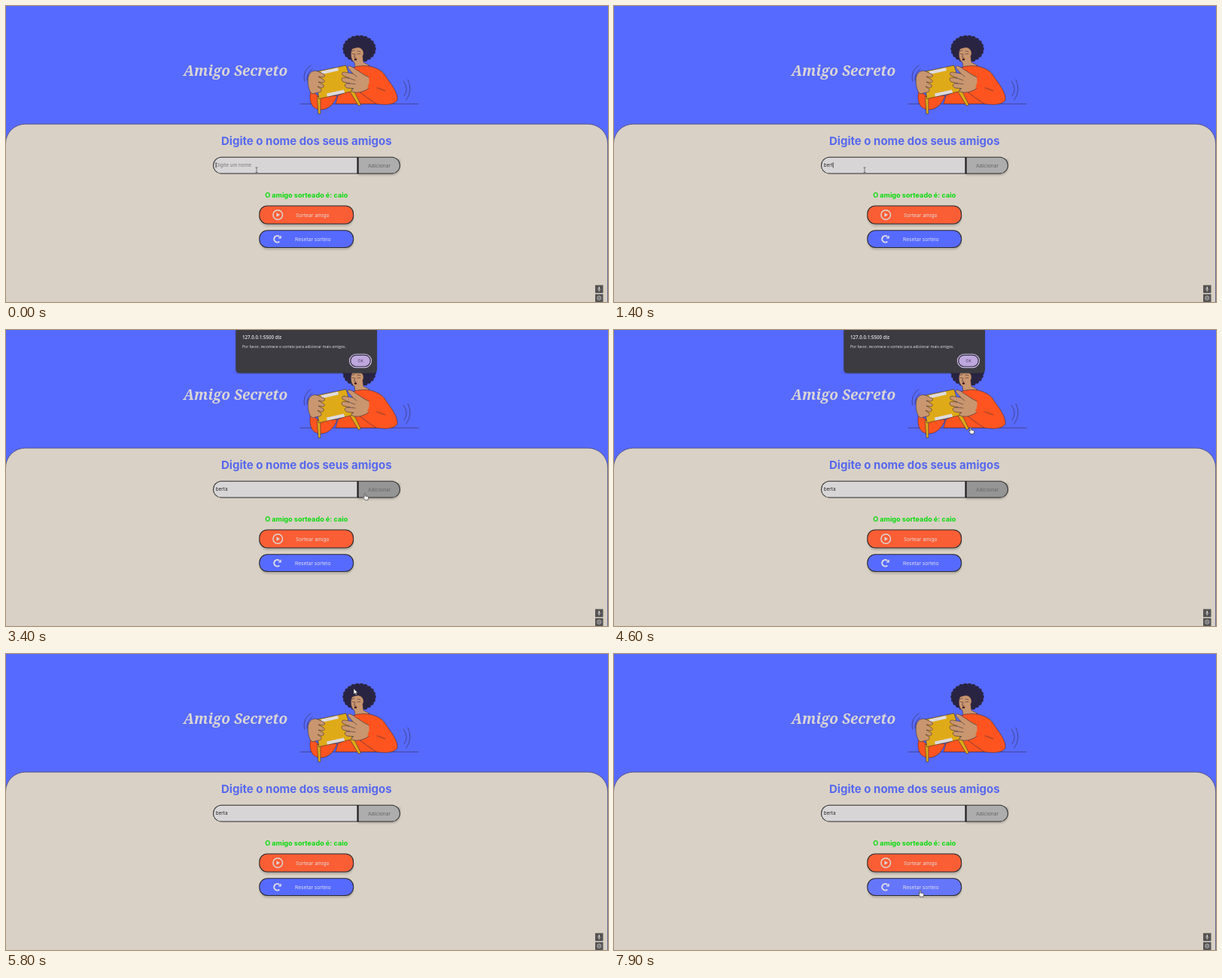
An HTML page for the animation above (8000 ms loop, 800 by 394 pixels).

```html
<!DOCTYPE html>
<html lang="pt-BR">
<head>
<meta charset="utf-8">
<title>Amigo Secreto</title>
<style>
  html, body { margin: 0; width: 100%; height: 100%; overflow: hidden; background: #576aff; }
  svg { display: block; width: 800px; height: 394px; }
  text { font-family: Inter, sans-serif; font-size: 6.7px; white-space: pre; }
  .mid { text-anchor: middle; }
  .title { font: italic 700 19px "Noto Serif", serif; fill: #d9d5d5; }
  .dialog text { font-family: "Open Sans", sans-serif; fill: #e4e2e8; }
  .ink { stroke: #33283a; stroke-width: .55; stroke-linejoin: round; stroke-linecap: round; }
  .line { fill: none; }
  .box { stroke: #2b292c; stroke-width: 1.05; }
  .shade { fill: #000; opacity: .17; filter: url(#soft); }
</style>
</head>
<body>
<svg viewBox="0 0 800 394">
  <defs>
    <filter id="soft" x="-20%" y="-40%" width="140%" height="180%"><feGaussianBlur stdDeviation="1.3"/></filter>
  </defs>
  <rect width="800" height="394" fill="#576aff"/>
  <text class="title mid" x="305" y="93">Amigo Secreto</text>

  <g id="art">
    <path class="ink line" d="M391 130.300H548"/>
    <path class="ink line" d="M405 79Q394 86 396.500 100M407 84Q399 90 400 99M528 100Q536 110 529 120M534 98Q541 112 532 125"/>
    <g id="hair" fill="#2a2443"></g>
    <path class="ink" fill="#c9966f" d="M460 57C457 63 458 72 463 75L464 81Q474 87 483 79L475 75L474 67C477 62 474 55 467 55Z"/>
    <path class="ink line" d="M460 63.500l3 .5M467 64l4 -.5M464 64l-1.500 4 2 .5M460 60l3-1M467 60l4 .5"/>
    <ellipse cx="464.500" cy="71" rx="1.800" ry="1.500" fill="#4b1c27"/>
    <path class="ink" fill="#ff5420" d="M461 82C477 76 498 81 505 94C514 107 521 116 520 125C517 132 502 132 492 130.300H438L441 119L458 112Z"/>
    <path class="ink line" d="M466 112C474 117 483 125 492 130.300M489 104l8 3M491 108l13 5"/>
    <path class="ink" fill="#ff5420" d="M405 112C402 125 405 136 416 138C428 139 437 130 440 119L417 121Z"/>
    <path class="ink" fill="#dfaa18" d="M413.500 121L415 143.500H418L417.800 121ZM456 112L468.500 133L471.500 131.500L461 110Z"/>
    <path class="ink" fill="#dfaa18" d="M411 87.500L452 79L462 113L416 123.500Z"/>
    <path fill="#dedbe0" d="M418.500 87L441 82L442 86L420 91ZM426 116.500L449 111.500L450 115.500L427 120.500Z"/>
    <path class="ink" fill="#c9966f" d="M402 93C404 87 410 85 414 87L423 91Q425 94 421 95L415 94L422 98Q425 101 421 102L415 101L422 105Q423 109 419 109L414 107L419 111Q420 115 415 115L407 117C402 114 400 101 402 93Z"/>
    <path class="ink" fill="#c9966f" d="M488 98L475 91L460 81Q454 78 454 82L461 90L450 88Q445 88 447 92L456 96L448 95Q444 97 448 101L457 103L452 103Q448 106 453 109L462 110L459 111Q459 115 464 115C473 116 480 111 484 108Z"/>
    <path class="ink line" d="M456 96l8 3M457 103l7 1M461 90l5 4"/>
    <path fill="#ff5420" d="M482 95Q487 92 491 96L499 107L486 110L480 108Q484 102 482 95Z"/>
  </g>

  <path d="M-.5 395V183A26 26 0 0 1 25.500 157.200H773.500A26 26 0 0 1 799.600 183V395Z" fill="#d9d1c5" stroke="#454365" stroke-width=".7"/>
  <text class="mid" x="399.300" y="184.800" style="font-size:15px;font-weight:700" fill="#5768ee">Digite o nome dos seus amigos</text>

  <path class="shade" d="M468 204H524V214A11 11 0 0 1 513 225.500H468Z"/>
  <path class="box" fill="#d7d5d6" d="M467 201.300H285.300A10.900 10.900 0 0 0 285.300 223H467Z"/>
  <path id="add" class="box" d="M468 201.300H513.700A10.900 10.900 0 0 1 513.700 223H468Z"/>
  <path d="M467.600 201V223.300" stroke="#222022" stroke-width="1.500"/>
  <text class="mid" x="496" y="214.500" fill="#66666a">Adicionar</text>
  <text id="field" x="278.700" y="214.200" style="font-size:6.4px"></text>
  <path id="caret" d="M0 208V215.500" stroke="#222" stroke-width=".7"/>

  <text class="mid" x="399.200" y="255" style="font-size:9.1px;font-weight:700" fill="#08dc0c">O amigo sorteado é: caio</text>

  <rect class="shade" x="337" y="269" width="125" height="24" rx="11"/>
  <rect class="box" x="336.800" y="265.900" width="124.800" height="24" rx="10.500" fill="#fa5e35"/>
  <circle cx="361.200" cy="278" r="6.300" fill="none" stroke="#ded9da" stroke-width="1.400"/>
  <path d="M359.500 275.300L364 278L359.500 280.700Z" fill="#ded9da"/>
  <text class="mid" x="407.300" y="280.500" fill="#e4dcdc">Sortear amigo</text>

  <rect class="shade" x="337" y="301" width="125" height="23.500" rx="11"/>
  <rect id="reset" class="box" x="336.800" y="298.700" width="124.800" height="22.800" rx="10.500"/>
  <path d="M363.300 306.900A4.300 4.300 0 1 0 363.300 313.500" fill="none" stroke="#dedce4" stroke-width="2"/>
  <path d="M365.800 305.300V309.600H361.500Z" fill="#dedce4"/>
  <text class="mid" x="407.800" y="312.500" fill="#dedff0">Resetar sorteio</text>

  <g fill="#555253">
    <rect x="783" y="371.500" width="10.500" height="10.500"/>
    <rect x="783" y="383.500" width="10.500" height="10.500"/>
  </g>
  <g fill="none" stroke="#dcdadb" stroke-width=".8">
    <path d="M788.200 374.500V376.500" stroke-width="1.600" stroke-linecap="round"/>
    <path d="M786.200 376.500Q788.200 380 790.200 376.500M788.200 378.300V380"/>
    <circle cx="788.200" cy="388.700" r="2.600"/><circle cx="788.200" cy="388.700" r=".6"/>
  </g>

  <g id="dialog" class="dialog">
    <path class="shade" d="M305 0H493V58H305Z"/>
    <path d="M305.300 0H493V52Q493 57.500 487.500 57.500H311Q305.300 57.500 305.300 52Z" fill="#3c3b41"/>
    <text x="314" y="11.900" style="font-size:6.2px;font-weight:600">127.0.0.1:5500 diz</text>
    <text x="314" y="24.100" style="font-size:5.1px">Por favor, recomece o sorteio para adicionar mais amigos.</text>
    <rect x="456.500" y="32.300" width="29" height="17.600" rx="8.800" fill="#302b3e" stroke="#d9c9f2" stroke-width="1.100"/>
    <rect x="458.300" y="34" width="25.400" height="14.200" rx="7.100" fill="#bda7dd"/>
    <text class="mid" x="471" y="43" style="font-size:5.2px;fill:#43305f">OK</text>
  </g>

  <g id="cursor">
    <path id="beam" d="M-1.500 -3H1.500M0 -3V3.500M-1.500 3.500H1.500" fill="none" stroke="#4b494b" stroke-width=".7"/>
    <path id="arrow" d="M0 0V7.500L1.800 6L3 8.600L4.300 8L3.200 5.500H5.500Z" fill="#f4f2f3" stroke="#222" stroke-width=".5"/>
    <path id="hand" d="M-.8 .7Q0 -.5 .8 .7V4L3.700 4.600Q5 5 4.800 6.300L4 9.300H.2L-2.700 5.700Q-2.300 4.300 -.8 5.600Z" fill="#f4f2f3" stroke="#222" stroke-width=".6"/>
  </g>
</svg>
<script>
const LOOP = 8000, NAME = "berta";
const KEYS = [900, 1050, 1200, 1350, 1550];
const DIALOG = [2800, 5600], RELEASE = 4700, BLUR = 2550;
// time, x, y of the pointer tip
const PATH = [
  [0, 333, 218], [1800, 333, 218], [2200, 477, 217], [4300, 477, 217],
  [4900, 471, 42], [5600, 471, 42], [5800, 462, 46], [6400, 462, 58],
  [7200, 440, 130], [7700, 407, 314], [LOOP, 407, 314]
];
const $ = id => document.getElementById(id);
const show = (id, on) => $(id).style.display = on ? "" : "none";
const within = ([x, y], l, t, r, b) => x >= l && x <= r && y >= t && y <= b;

function buildHair() {
  const part = (rx, ry, x, y) =>
    `<ellipse cx="${x.toFixed(1)}" cy="${y.toFixed(1)}" rx="${rx}" ry="${ry}"/>`;
  let out = part(20, 16.5, 469.5, 57);
  for (let i = 0; i < 22; i++) {
    const a = i / 22 * Math.PI * 2;
    out += part(3.2, 2.9, 469.5 + 19 * Math.cos(a), 57 + 15.4 * Math.sin(a));
  }
  $("hair").innerHTML = out;
}

function pointer(t) {
  const i = PATH.findIndex((p, n) => n && t <= p[0]);
  const [a, x, y] = PATH[i - 1], [b, x2, y2] = PATH[i];
  const k = (t - a) / (b - a), e = k * k * (3 - 2 * k);
  return [x + (x2 - x) * e, y + (y2 - y) * e];
}

function drawField(t) {
  const typed = KEYS.filter(k => t >= k).length;
  const field = $("field"), text = NAME.slice(0, typed) || "Digite um nome";
  if (field.textContent !== text) field.textContent = text;
  field.setAttribute("fill", typed ? "#2b2a2c" : "#7a7879");
  const since = t - (typed ? KEYS[typed - 1] : 0);
  const x = 279 + (typed ? field.getComputedTextLength() : 0);
  $("caret").setAttribute("transform", `translate(${x})`);
  show("caret", t < BLUR && since % 1000 < 500);
}

function draw(t) {
  const tip = pointer(t);
  const modal = t >= DIALOG[0] && t < DIALOG[1];
  const held = modal && t < RELEASE;
  const onAdd = held || !modal && within(tip, 468, 201, 525, 224);
  const onReset = !modal && within(tip, 337, 298, 462, 322);
  const onDraw = !modal && within(tip, 337, 266, 462, 290);
  const beam = !modal && within(tip, 274, 201, 467.9, 224);
  const hand = onAdd || onReset || onDraw;

  drawField(t);
  $("add").setAttribute("fill", onAdd ? "#949594" : "#adadad");
  $("reset").setAttribute("fill", onReset ? "#6676fb" : "#576aff");
  show("dialog", modal);
  show("beam", beam);
  show("hand", hand);
  show("arrow", !beam && !hand);
  $("cursor").setAttribute("transform", `translate(${tip})`);
}

buildHair();
const start = performance.now();
function tick() {
  draw((performance.now() - start) % LOOP);
  requestAnimationFrame(tick);
}
tick();
</script>
</body>
</html>
```
